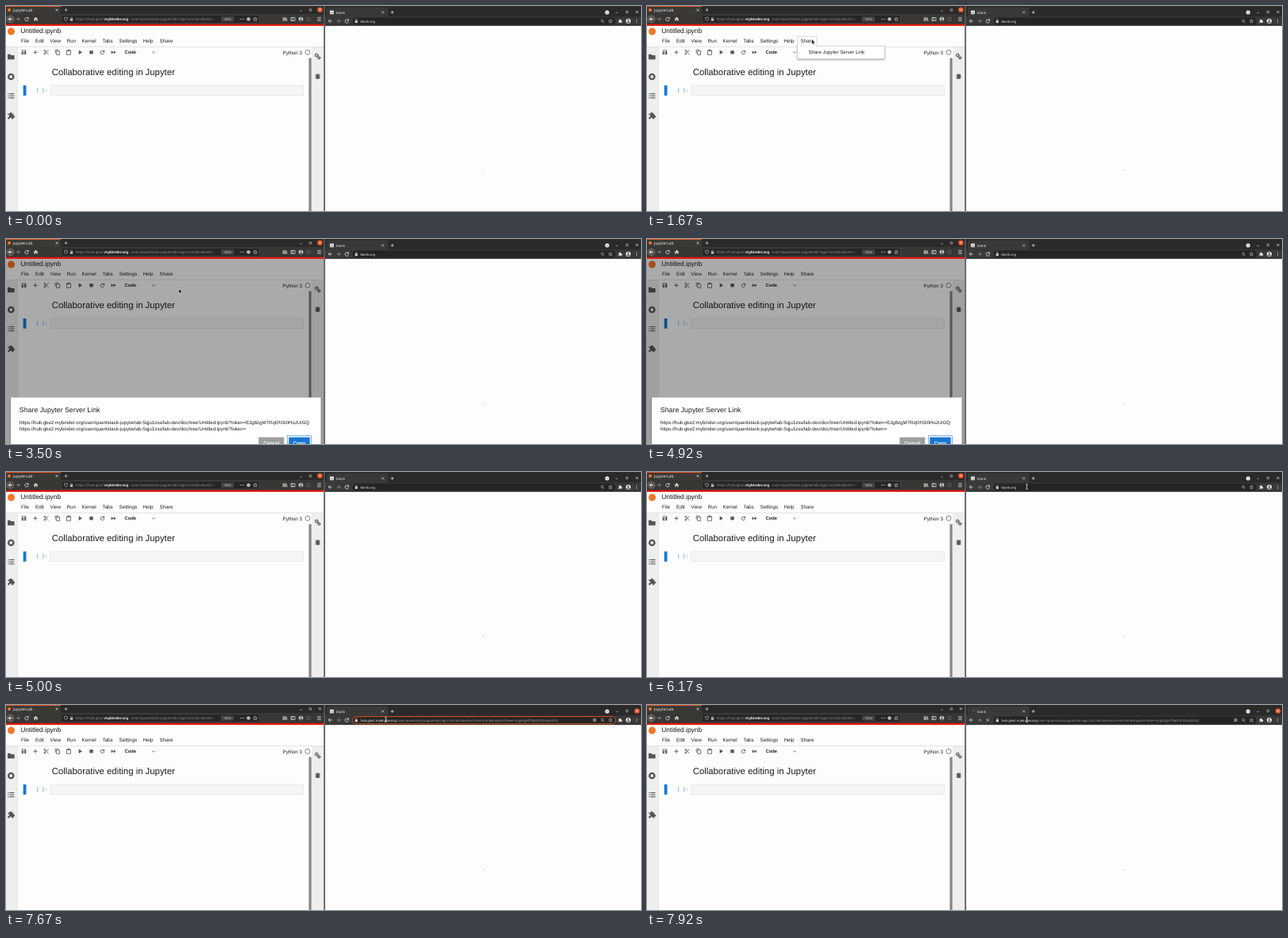
An HTML page that plays this animation: 800x258 px, repeating every 8000 ms.

```html
<!DOCTYPE html>
<html lang="en">
<head>
<meta charset="utf-8">
<title>Collaborative editing</title>
<style>
  html, body { margin: 0; width: 100%; height: 100%; overflow: hidden; background: #fdfdfd; }
  svg { display: block; width: 800px; height: 258px; text-rendering: geometricPrecision; }
  text { white-space: pre; }
</style>
</head>
<body>
<svg id="stage" viewBox="0 0 800 258"></svg>
<script>
const SANS = "'Liberation Sans', Arial, sans-serif";
const UI = "'Noto Sans', sans-serif";
const MONO = "'DejaVu Sans Mono', monospace";
const ORANGE = '#e95420', BLUE = '#1976d2', ICON = '#555', LIGHT = '#d6d6d4';

const rect = (x, y, w, h, fill, extra = '') =>
  `<rect x="${x}" y="${y}" width="${w}" height="${h}" fill="${fill}" ${extra}/>`;
const circle = (x, y, r, fill, extra = '') =>
  `<circle cx="${x}" cy="${y}" r="${r}" fill="${fill}" ${extra}/>`;
const text = (x, y, size, str, fill = '#1d1d1d', font = SANS, extra = '') =>
  `<text x="${x}" y="${y}" font-size="${size}" font-family="${font}" fill="${fill}" ${extra}>${str}</text>`;
const solid = (x, y, d, color = ICON) =>
  `<path transform="translate(${x} ${y})" d="${d}" fill="${color}" fill-rule="evenodd"/>`;
const line = (x, y, d, color = ICON, width = 0.9) =>
  `<path transform="translate(${x} ${y})" d="${d}" fill="none" stroke="${color}" stroke-width="${width}"/>`;
const group = (id, content) => `<g id="${id}">${content}</g>`;

const CROSS = 'M-1.5-1.5 1.5 1.5M-1.5 1.5 1.5-1.5';
const PLUS = 'M-2 0H2M0-2V2';
const BACK = 'M2.3 0H-2.2M0-2.2-2.2 0 0 2.2';
const FORWARD = 'M-2.3 0H2.2M0-2.2 2.2 0 0 2.2';
const RELOAD = 'M1.6-1.4A2.2 2.2 0 1 0 2.2.4M2.3-2.6V-.8H.5';
const LOCK = 'M-1.7-.5H1.7V2.3H-1.7ZM-1.2-.5V-1.3A1.2 1.2 0 0 1 1.2-1.3V-.5H.6V-1.3A.6.6 0 0 0-.6-1.3V-.5Z';
const STAR = 'M0-2.4.7-.8 2.4-.6 1.1.5 1.5 2.2 0 1.3-1.5 2.2-1.1.5-2.4-.6-.7-.8Z';
const PUZZLE = 'M-4-2.5H-1.6A1.4 1.4 0 1 1 1.1-2.5H3V-.2A1.4 1.4 0 1 1 3 2.5V4.3H.9A1.4 1.4 0 1 0-1.8 4.3H-4V1.8A1.4 1.4 0 1 0-4-.9Z';
const PERSON = 'M0-2.3A1.1 1.1 0 1 1-.01-2.3ZM-2.2 2.2A2.2 1.9 0 0 1 2.2 2.2Z';
const FOLDER = 'M-4.3-3.2H-1L.2-2H4.3V3.3H-4.3Z';

const HOST = 'hub.gke2.', DOMAIN = 'mybinder.org';
const PATH = '/user/quantstack-jupyterlab-5qju1zss/lab-dev/doc/';
const TREE = 'tree/Untitled.ipynb?token=', TOKEN = 'EJg8zgM7RqOhSI0HoJUiGQ';

const windowButtons = (x, y, step) =>
  line(x - 2 * step, y, 'M-1.3 1H1.3', '#bbb', 0.7) +
  line(x - step, y, 'M-1.2-1.2H1.2V1.2H-1.2Z', '#bbb', 0.7);
const closeButton = (id, x, y) =>
  circle(x, y, 3.3, ORANGE, `id="${id}"`) + line(x, y, CROSS, '#eee', 0.7);

function leftBrowser() {
  return rect(0, 0, 401, 10.5, '#2b2a28') + rect(0, 0, 69, 10.5, '#3a3936') +
    rect(0, 0, 69, 1, ORANGE) + circle(4, 5, 2, '#f37726') +
    text(9, 6.9, 4.9, 'JupyterLab', '#eee', UI) +
    line(64, 5, CROSS, LIGHT, 0.7) + line(75.5, 5, PLUS, LIGHT, 0.7) +
    windowButtons(395.5, 5, 12) + closeButton('leftClose', 395.5, 4.7) +
    rect(0, 10, 401, 13, '#383734') +
    circle(5.5, 16.5, 4.6, '#55534f', 'stroke="#999" stroke-width=".4"') +
    line(5.5, 16.5, BACK, '#fff') + line(15, 16.5, FORWARD, '#888') +
    line(26, 16.5, RELOAD, LIGHT) + solid(37.5, 16.5, 'M-3 .2 0-2.8 3 .2H2V2.6H.7V.6H-.7V2.6H-2V.2Z', LIGHT) +
    rect(69.5, 11.5, 249.5, 10, '#272624', 'rx="1.5" stroke="#504f4c" stroke-width=".5"') +
    line(75.5, 16.5, 'M-2-1.8 0-2.5 2-1.8Q2 1.2 0 2.5-2 1.2-2-1.8Z', '#bbb', 0.7) +
    solid(82.5, 16.5, LOCK, '#bbb') +
    text(87.5, 18.1, 4.5, 'https://' + HOST, '#8f8f8d', UI) +
    text(124, 18.1, 4.5, DOMAIN, '#f2f2f2', UI, 'font-weight="600"') +
    text(157, 18.1, 4.5, PATH, '#8f8f8d', UI) +
    rect(256, 12, 12, 9, 'url(#fade)') +
    rect(271, 13.2, 16, 6.6, '#454441', 'rx="1"') + text(274, 18, 3.8, '150%', '#ddd', UI) +
    [-2, 0, 2].map(dx => circle(297.5 + dx, 16.5, 0.6, LIGHT)).join('') +
    circle(305.5, 16.5, 2.3, '#bbb') + line(314, 16.5, STAR, LIGHT, 0.6) +
    line(351.5, 16.5, 'M-2.3-2.2V2.4M-.8-2.2V2.4M.6-2.2V2.4M1.3-2 2.7 2.4', LIGHT) +
    line(361.5, 16.5, 'M-2.5-2H2.5V2H-2.5ZM-.6-2V2', LIGHT, 0.8) +
    circle(371.5, 16.5, 2.8, LIGHT) + solid(371.5, 16.5, PERSON, '#555') +
    line(381, 16.5, 'M-2-1.8H2V1.8H-2Z', '#777', 0.6) +
    line(394.5, 16.5, 'M-2.3-2H2.3M-2.3 0H2.3M-2.3 2H2.3', LIGHT, 0.8) +
    rect(0, 22.8, 400.5, 2.2, '#e3170d');
}

function notebook() {
  const menus = { File: 19, Edit: 37, View: 55.5, Run: 76.5, Kernel: 95.5, Tabs: 121.5,
    Settings: 142.5, Help: 172.5, Share: 193.5 };
  const y = 58.3;
  const toolbar =
    solid(22.5, y, 'M-2.8-2.8H1.8L2.8-1.8V2.8H-2.8ZM-2-2V-.5H1.2V-2ZM0 .3A1 1 0 1 0 .01 .3Z') +
    line(37, y, 'M-2.5 0H2.5M0-2.5V2.5') +
    line(50.8, y, 'M-1.7-1.6 2.8 2.8M-1.7 1.6 2.8-2.8', ICON, 0.8) +
    circle(48.8, y - 1.9, 1, 'none', 'stroke="#555" stroke-width=".8"') +
    circle(48.8, y + 1.9, 1, 'none', 'stroke="#555" stroke-width=".8"') +
    line(65, y, 'M-2.8 1.5V-3H1.2M-1.3-1.6H2.6V3.1H-1.3Z', ICON, 0.8) +
    line(79, y, 'M-2.5-2.4H2.5V3H-2.5ZM-1.2-3V-1.7H1.2V-3Z', ICON, 0.8) +
    solid(93.5, y, 'M-1.8-2.7 2.4 0-1.8 2.7Z') + rect(105.3, y - 2.1, 4.4, 4.2, ICON) +
    line(121.5, y, RELOAD) + solid(135.5, y, 'M-2.9-2.1 0 0-2.9 2.1ZM.1-2.1 3 0 .1 2.1Z') +
    text(149.5, 60.4, 5.8, 'Code', '#222', SANS, 'font-weight="bold"') +
    line(186, y, 'M-1.8-.8 0 1 1.8-.8', ICON, 0.8) +
    text(348.5, 60.6, 6.2, 'Python 3') +
    circle(380, y, 3, '#fff', 'stroke="#555" stroke-width=".7"');
  const list = [-2.6, 0, 2.6].map(dy =>
    rect(2.3, 113 + dy - 0.5, 1.2, 1.1, ICON) + rect(4.4, 113 + dy - 0.5, 6, 1.1, ICON)).join('');
  const gear = (x, cy, r) => circle(x, cy, r, 'none', `stroke="${ICON}" stroke-width="1.1"`) +
    circle(x, cy, r + 0.8, 'none', `stroke="${ICON}" stroke-width=".7" stroke-dasharray="1 1"`);
  const sidebars = rect(0, 51.5, 14.7, 207, '#eee') + rect(385, 51.5, 15.5, 207, '#eee') +
    solid(6.3, 64, FOLDER) +
    circle(6.3, 89, 4.3, ICON) + rect(4.6, 87.3, 3.4, 3.4, '#eee') +
    list + solid(6.3, 138, PUZZLE) +
    gear(391.3, 62, 1.5) + gear(394.3, 65.2, 1.2) +
    line(392.7, 88.6, 'M-3.2-1.7H3.2M-3.2.3H3.2M-3.2 2.2H3.2M-1.6-3.4-.7-2.3M1.6-3.4.7-2.3', ICON, 0.8) +
    rect(390.6, 85.7, 4.2, 6.4, ICON, 'rx="2"');
  return rect(0, 25, 400.5, 233, '#fdfdfd') + circle(6.5, 32, 4.5, '#f37726') +
    text(18.3, 33.6, 8.4, 'Untitled.ipynb', '#111') +
    Object.entries(menus).map(([name, x]) => text(x, 46.4, 6.25, name)).join('') +
    sidebars + rect(0, 51, 400.5, 0.5, '#ccc') + toolbar +
    rect(381.5, 65.5, 3.2, 193, '#858585') + rect(14.5, 51, 0.4, 207, '#d5d5d5') +
    text(57.7, 87.2, 11.35, 'Collaborative editing in Jupyter') +
    rect(21.7, 100, 3.8, 12.7, BLUE) +
    text(38, 108.4, 5.8, '[ ]:', '#307fc1', MONO) +
    rect(55.8, 100, 319, 12.8, '#f5f5f5', 'stroke="#dcdcdc" stroke-width=".5"');
}

const shareMenu = () =>
  rect(189.7, 50.3, 109.5, 16, '#fff', 'stroke="#bbb" stroke-width=".5" filter="url(#shadow)"') +
  rect(189.7, 38.3, 24.3, 12.5, '#fff', 'stroke="#bbb" stroke-width=".5"') +
  rect(190, 49.8, 23.8, 1.5, '#fff') + text(193.5, 46.4, 6.25, 'Share') +
  rect(190, 53.3, 109, 10, '#eee', 'id="menuHover"') +
  text(203.5, 60, 6.12, 'Share Jupyter Server Link');

function shareDialog() {
  const url = 'https://' + HOST + DOMAIN + PATH + TREE;
  const button = (x, w, label, fill) => rect(x, 249.5, w, 16, fill, 'rx=".8"') +
    text(x + w / 2, 259, 6.2, label, '#fff', SANS, 'font-weight="bold" text-anchor="middle"');
  return rect(0, 25, 400.5, 233, '#000', 'opacity=".33"') +
    rect(6, 199.5, 390.5, 70, '#fff', 'filter="url(#shadow)"') +
    text(16.8, 218.4, 8.8, 'Share Jupyter Server Link') +
    text(16.8, 233.3, 6.1, url + TOKEN) + text(16.8, 241.3, 6.1, url) +
    button(318.3, 32, 'Cancel', '#9e9e9e') +
    rect(354.4, 247.7, 30.2, 20, 'none', `stroke="${BLUE}" stroke-width=".6"`) +
    button(356.2, 26.6, 'Copy', BLUE);
}

function rightBrowser() {
  const y = 19, size = 4.15;
  return rect(400.3, 0, 2, 258, '#5a5a5a') + rect(402, 0, 398, 14, '#2a2a29') +
    rect(404, 1.5, 77.5, 12.5, '#393937', 'rx="1.5"') +
    group('favicon', rect(408, 5.7, 5, 4.6, '#ddd') + rect(409, 8, 3, 0.6, '#777')) +
    group('spinner', line(410.5, 8, 'M0-2A2 2 0 0 1 2 0', '#777', 0.7)) +
    text(416, 9.5, 4.25, 'blank', '#eee', UI) +
    line(474.7, 8, CROSS, LIGHT, 0.7) + line(486.7, 8, PLUS, LIGHT, 0.8) +
    circle(757.3, 8, 2.6, '#eee') + line(757.3, 8, 'M-1-.4 0 .6 1-.4', '#333', 0.6) +
    windowButtons(795, 7.5, 12.7) + closeButton('rightClose', 795, 7.5) +
    rect(402, 13.3, 398, 12, '#393937') +
    line(408.5, y, BACK, LIGHT) + line(419, y, FORWARD, '#888') +
    group('reload', line(429.3, y, RELOAD, LIGHT)) + group('stop', line(429.3, y, CROSS, LIGHT)) +
    rect(436.5, 14.6, 331.5, 9, '#242423', 'id="pill" rx="4.5" stroke-width=".9"') +
    solid(441.3, y, LOCK, '#ccc') +
    rect(446, 15.7, 19.2, 6.6, ORANGE, 'id="selection"') +
    group('blankUrl', text(446.5, 20.6, size, 'blank.org', '#eee', UI)) +
    group('pastedUrl', text(446.5, 20.6, size,
      `<tspan fill="#eee">${HOST + DOMAIN}</tspan>${PATH + TREE + TOKEN}`, '#999', UI)) +
    group('extraIcon', line(741.5, y, 'M-1.6-1.6H1.6V1.6H-1.6ZM-1.6 0H1.6M0-1.6V1.6', '#bbb', 0.6)) +
    circle(751.2, y - 0.4, 1.5, 'none', 'stroke="#ccc" stroke-width=".6"') +
    line(751.2, y, 'M1 .8 2.4 2.2', '#ccc', 0.7) + line(761.5, y, STAR, '#ccc', 0.6) +
    `<g transform="translate(773.7 ${y}) scale(.55)">${solid(0, 0, PUZZLE, '#eee')}</g>` +
    circle(784, y, 3.1, '#eee') + solid(784, y, PERSON, '#555') +
    [-1.8, 0, 1.8].map(dy => circle(794.5, y + dy, 0.55, LIGHT)).join('') +
    rect(402.3, 25.2, 397.7, 233, '#fdfdfd') + rect(600.8, 206.5, 0.9, 1.2, '#999');
}

const arrow = '<path d="M0 0V6L1.4 4.8 2.4 7 3.4 6.5 2.5 4.4 4.3 4.2Z" fill="#111" stroke="#fff" stroke-width=".5"/>';
const beam = '<path d="M-1.3-3Q0-3 0-2.2 0-3 1.3-3M0-2.2V2.2M-1.3 3Q0 3 0 2.2 0 3 1.3 3" fill="none" stroke="#eee" stroke-width=".8"/>';

stage.innerHTML = `<defs>
  <linearGradient id="fade"><stop stop-color="#272624" stop-opacity="0"/><stop offset=".75" stop-color="#272624"/></linearGradient>
  <filter id="shadow" x="-10%" y="-30%" width="120%" height="170%"><feDropShadow dx="0" dy="1" stdDeviation="1.3" flood-opacity=".4"/></filter>
  </defs>` + notebook() + group('menu', shareMenu()) + group('dialog', shareDialog()) +
  leftBrowser() + rightBrowser() +
  group('cursor', group('arrow', arrow) + group('beam', beam));

// Pointer route: time, x, y
const route = [[420, 262, 155], [830, 216, 62], [1170, 207.5, 42], [1750, 207.5, 42],
  [2080, 211, 57], [2500, 213.5, 57.5], [3420, 213.5, 57.5], [4250, 371, 250],
  [4580, 372, 259], [5330, 372, 259], [6170, 478.5, 18.5], [8000, 478.5, 18.5]];

function pointerAt(t) {
  const i = Math.max(1, route.findIndex(p => p[0] >= t));
  const [t0, x0, y0] = route[i - 1], [t1, x1, y1] = route[i];
  const u = Math.max(0, (t - t0) / (t1 - t0));
  const k = u * u * (3 - 2 * u);
  return [x0 + (x1 - x0) * k, y0 + (y1 - y0) * k];
}

const el = id => document.getElementById(id);
const show = (id, on) => el(id).style.display = on ? '' : 'none';
const LOOP = 8000, STEP = 1000 / 12;

function draw(now) {
  const t = Math.floor((now % LOOP + 4) / STEP) * STEP;
  const [x, y] = pointerAt(t);
  const rightActive = t > 6400, pasted = t > 7570, loading = t > 7740;
  const editing = rightActive && !loading;
  const overAddress = x > 436 && y < 25;

  show('menu', t > 1300 && t < 2990);
  show('menuHover', y > 52);
  show('dialog', t > 3490 && t < 4990);
  show('leftClose', !rightActive);
  show('rightClose', rightActive);
  el('pill').setAttribute('stroke', editing ? ORANGE : 'none');
  show('selection', editing && !pasted);
  show('blankUrl', !pasted);
  show('pastedUrl', pasted);
  show('extraIcon', rightActive);
  show('favicon', !loading);
  show('spinner', loading);
  show('reload', !loading);
  show('stop', loading);
  show('cursor', t > 410);
  show('arrow', !overAddress);
  show('beam', overAddress);
  el('cursor').setAttribute('transform', `translate(${x} ${y})`);
  requestAnimationFrame(() => draw(performance.now()));
}
draw(0);
</script>
</body>
</html>
```
